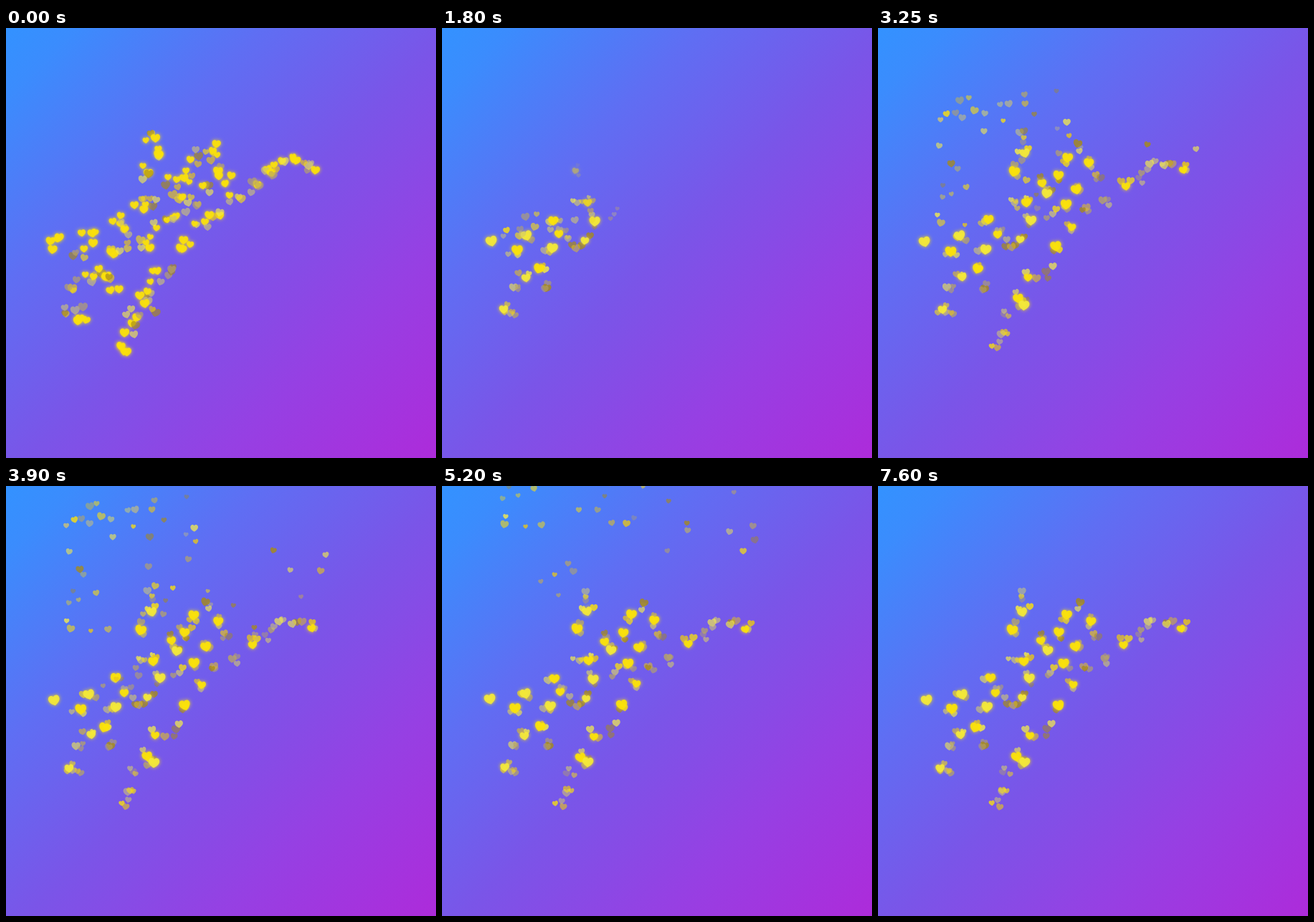
An HTML page with a canvas for the animation above (7.65 s loop, 600 by 600 pixels).

```html
<!DOCTYPE html>
<html>
<head>
<meta charset="utf-8">
<style>
  html, body { margin: 0; width: 100%; height: 100%; overflow: hidden; }
  canvas { display: block; }
</style>
</head>
<body>
<canvas id="stage" width="600" height="600"></canvas>
<script>
const ctx = document.getElementById('stage').getContext('2d');
const LOOP = 7650, STEP = 50, RISE = 0.112;

// Centres of the written strokes as x, y pairs.
const bright = [67,298, 117,348, 103,311, 116,290, 137,336, 88,393, 155,268, 165,288, 152,308,
  199,296, 213,269, 205,244, 229,217, 237,230, 251,205, 263,180, 296,188, 277,225, 261,247,
  203,175, 188,200, 272,277, 250,305, 210,349, 195,378, 205,386, 425,199, 344,221];
const soft = [103,400, 98,362, 149,357, 180,304, 190,244, 202,154, 242,260, 283,166, 303,206,
  293,256, 320,239, 363,208, 379,190, 405,190, 236,339, 176,400, 174,424, 168,447];

const pairs = list => Array.from({ length: list.length / 2 }, (_, i) => [list[2 * i], list[2 * i + 1]]);
const random = n => { const v = Math.sin(n * 127.1 + 3.7) * 43758.5453; return v - Math.floor(v); };
const clamp = v => Math.max(0, Math.min(1, v));

const sky = ctx.createLinearGradient(0, 0, 600, 600);
sky.addColorStop(0, '#3392ff');
sky.addColorStop(.08, '#3b8cfd');
sky.addColorStop(.3, '#5f6ef3');
sky.addColorStop(.52, '#7a55e8');
sky.addColorStop(.75, '#9640e3');
sky.addColorStop(1, '#ad2bda');

const tones = ['#e8c619', '#f0e850', '#a68a18', '#c9c07a', '#f5dc14', '#b8a565'];
const tone = seed => tones[Math.floor(random(seed + .8) * tones.length)];
const lean = seed => (random(seed + .6) - .5) * .6;

function heart(x, y, r, color, alpha, tilt, glow = 0) {
  ctx.save();
  ctx.translate(x, y);
  ctx.rotate(tilt);
  ctx.scale(r, r);
  ctx.globalAlpha = alpha;
  ctx.fillStyle = color;
  ctx.shadowColor = '#ffe600';
  ctx.shadowBlur = glow;
  ctx.beginPath();
  ctx.moveTo(0, -.65);
  ctx.bezierCurveTo(.35, -1.15, 1.1, -.9, 1.05, -.2);
  ctx.bezierCurveTo(1, .4, .4, .75, 0, 1);
  ctx.bezierCurveTo(-.4, .75, -1, .4, -1.05, -.2);
  ctx.bezierCurveTo(-1.1, -.9, -.35, -1.15, 0, -.65);
  ctx.fill();
  ctx.restore();
}

// Scatters small hearts around each centre.
function around(centres, count, reach, seed) {
  return centres.flatMap(([x, y], i) => Array.from({ length: count }, (_, k) => {
    const n = seed + i * count + k;
    const angle = random(n) * 2 * Math.PI, distance = reach * (.4 + .6 * random(n + .4));
    return [x + distance * Math.cos(angle), y + distance * Math.sin(angle)];
  }));
}

// The upper diagonal is written first, then the lower one.
function revealTime(x, y) {
  const along = x - y;
  if (x + y > 535) return 2000 + (along + 285) * .87;
  return along < 0 ? 400 + (along + 305) * 4.4 : 1780 + along * 4;
}

function settled([x, y], seed, t, isBright) {
  const grow = clamp((t - revealTime(x, y)) / 300);
  if (!grow) return;
  const phase = random(seed) * 6.28;
  const px = x + 2 * Math.sin(t / 420 + phase);
  const py = y + Math.sin(t / 530 + phase * 2);
  const scale = .4 + .6 * grow;
  if (isBright) {
    const color = random(seed + .8) < .75 ? '#fbe20a' : '#f3e93c';
    heart(px, py, (5.5 + 2 * random(seed + .3)) * scale, color, .9 * grow, lean(seed), 5);
  } else {
    heart(px, py, (3.5 + 2.5 * random(seed + .3)) * scale, tone(seed),
      (.4 + .45 * random(seed + .9)) * grow, lean(seed));
  }
}

function rising(i, t) {
  const seed = i + 500, late = i > 54;
  const x = late ? 105 + 90 * random(seed) : 85 + 360 * random(seed) ** 1.4;
  const y3250 = (late ? 310 : 78) + (late ? 100 : 200) * random(seed + .2) + (x > 310 ? 50 : 0);
  const y = y3250 - (t - 3250) * RISE;
  const start = x < 310 ? Math.min(300, 480 - x) : 330 - x * .32;
  if (y > start || y < -10 || t < revealTime(x, start)) return;
  heart(x + 3 * Math.sin(t / 600 + seed), y, 2.8 + 3 * random(seed + .3), tone(seed),
    (.35 + .5 * random(seed + .7)) * clamp((start - y) / 15), lean(seed));
}

function openingHeart([x, y], seed) {
  const lit = random(seed + .2) < .45;
  heart(x, y, 4.3 + 2.2 * random(seed + .5), lit ? '#fae00c' : tone(seed),
    lit ? .9 : .65, lean(seed), lit ? 5 : 0);
}

const brightHearts = pairs(bright), softCentres = pairs(soft);
const softHearts = [...softCentres, ...around(brightHearts.slice(1), 2, 11, 40), ...around(softCentres, 2, 10, 140)];
const openingHearts = around([...brightHearts, ...softCentres], 4, 12, 700);

function draw(now) {
  const t = Math.floor((now % LOOP) / STEP) * STEP;
  ctx.fillStyle = sky;
  ctx.fillRect(0, 0, 600, 600);
  if (t < STEP) {
    openingHearts.forEach((p, i) => openingHeart(p, i + 300));
    return;
  }
  softHearts.forEach((p, i) => settled(p, i + 100, t, false));
  brightHearts.forEach((p, i) => settled(p, i + 1, t, true));
  for (let i = 0; i < 60; i++) rising(i, t);
}

const begin = performance.now();
function tick() {
  draw(performance.now() - begin);
  requestAnimationFrame(tick);
}
tick();
</script>
</body>
</html>
```
